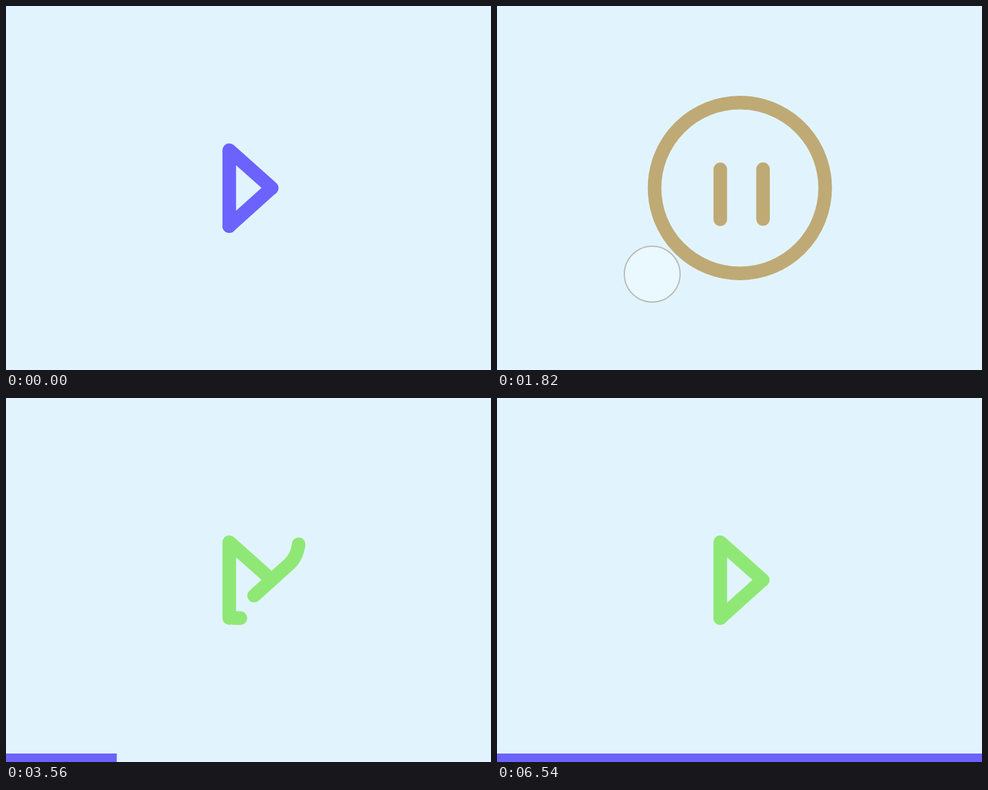
These frames come from a looping animation (800 by 600 pixels, 6.68 s). An HTML page:

```html
<!DOCTYPE html>
<html lang="en">
<head>
<meta charset="utf-8">
<title>Play and pause</title>
<style>
  html, body { margin: 0; width: 100%; height: 100%; overflow: hidden; background: #e1f4fe; }
  svg { display: block; width: 100vw; height: 100vh; }
  #icon { fill: none; stroke-width: 22.4; stroke-linecap: round; stroke-linejoin: round; }
</style>
</head>
<body>
<svg viewBox="0 0 800 600">
  <g id="icon">
    <path id="left" d="M438.4 300 L368.3 237.6 V362.7"/>
    <path id="right" d="M368.3 362.8 H438.8 V238.4"/>
    <path id="ring"/>
  </g>
  <rect id="bar" y="586" height="14" fill="#6c63ff"/>
  <circle id="cursor" r="46" fill="#fff" fill-opacity=".3" stroke="#b8b8b8" stroke-width="2"/>
</svg>
<script>
const LOOP = 6680;
const MORPH = 1000, PAUSE_AT = 850, PLAY_AT = 2684;
const PURPLE = [108, 99, 255], GREEN = [143, 232, 117], TAN = [192, 169, 117];

const el = id => document.getElementById(id);
const icon = el('icon'), left = el('left'), right = el('right');
const ring = el('ring'), bar = el('bar'), cursor = el('cursor');

// Lower edge of the triangle, a spiral outwards, then three turns of the circle.
const turn = 'a140.7 140.7 0 0 0 0 281.4 a140.7 140.7 0 0 0 0 -281.4 ';
ring.setAttribute('d', 'M368.3 362.7 L468 273 C497 246 490 159.3 400.6 159.3 ' + turn.repeat(3));

const clamp = x => Math.min(1, Math.max(0, x));
const span = (t, from, to) => clamp((t - from) / (to - from));
const mix = (a, b, k) => a + (b - a) * k;
const blend = (a, b, k) => `rgb(${a.map((v, i) => Math.round(mix(v, b[i], k)))})`;

const linear = p => p;
const quadIn = p => p * p;
const inOut = n => p => p < .5 ? (2 * p) ** n / 2 : 1 - (2 - 2 * p) ** n / 2;
const quad = inOut(2), cubic = inOut(3), quint = inOut(5);

// Cursor stops: time, x, y and the easing that leads there.
const stops = [
  [130, 849, 325, linear], [800, 347, 410, quad], [850, 347, 410, linear],
  [1010, 256, 442, quad], [2190, 256, 442, linear], [2340, 368, 410, quad],
  [2470, 368, 410, linear], [2680, 375, 416, linear], [2900, 429, 490, quadIn],
  [3340, 849, 505, linear]
];

function cursorAt(t) {
  const i = stops.findIndex(s => s[0] > t);
  if (i < 1) return [900, 300];
  const [t0, x0, y0] = stops[i - 1], [t1, x1, y1, ease] = stops[i];
  const k = ease(span(t, t0, t1));
  return [mix(x0, x1, k), mix(y0, y1, k)];
}

function dash(path, from, to) {
  path.setAttribute('stroke-dasharray', `${Math.max(.01, to - from)} 9999`);
  path.setAttribute('stroke-dashoffset', -from);
}

// m runs from 0 (play) to MORPH (pause).
function drawIcon(m) {
  const settle = cubic(span(m, 790, MORPH));
  const edge = 93.85;
  dash(left,
    (edge + 31.7) * quint(span(m, 0, 380)),
    edge + 125.1 - 11.2 * cubic(span(m, 400, 640)));

  const end = 70.5 + 124.4, shift = 31 * settle;
  dash(right,
    (end - 82) * cubic(span(m, 0, 480)) - shift,
    end * cubic(span(m, 0, 430)) - shift);

  const k = cubic(span(m, 0, 640)), start = 1940 * k;
  dash(ring, start, start + 92 + 803 * k);
  return settle;
}

function render(t) {
  const m = t < PLAY_AT ? span(t, PAUSE_AT, PAUSE_AT + MORPH) * MORPH
                        : MORPH - span(t, PLAY_AT, PLAY_AT + MORPH) * MORPH;
  const settle = drawIcon(m);
  const hover = quad(span(t, 440, 740));
  icon.setAttribute('stroke', t < PAUSE_AT ? blend(PURPLE, GREEN, hover) : blend(GREEN, TAN, settle));

  bar.setAttribute('width', 800 * span(t, PLAY_AT, PLAY_AT + 3840));

  const [x, y] = cursorAt(t);
  cursor.setAttribute('cx', x);
  cursor.setAttribute('cy', y);
}

const begin = performance.now();
function tick() {
  render((performance.now() - begin) % LOOP);
  requestAnimationFrame(tick);
}
tick();
</script>
</body>
</html>
```
